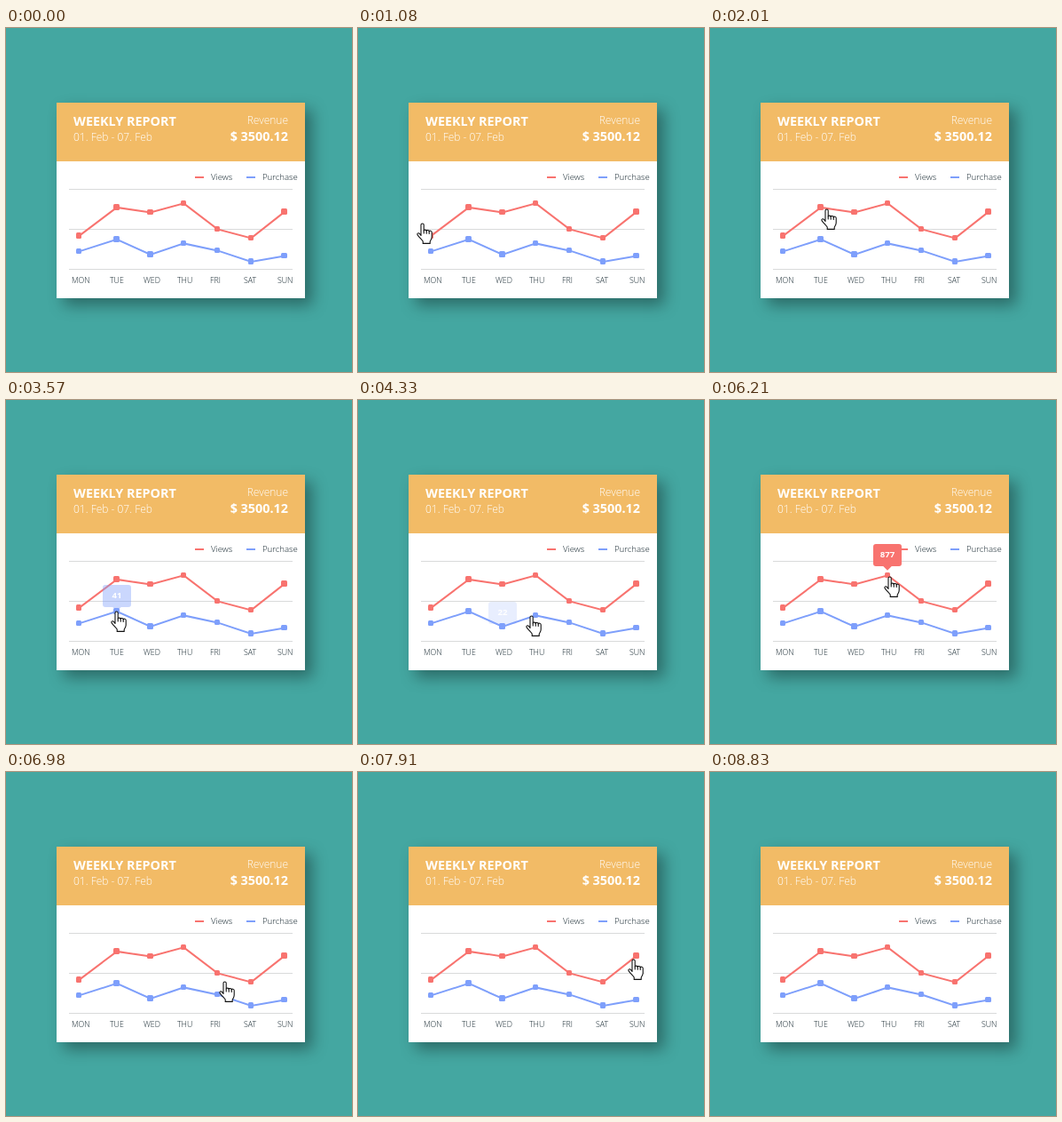
An HTML page that plays this animation: 390 px wide and 387 px high, repeating every 9540 ms.

```html
<!DOCTYPE html>
<html lang="en">
<head>
<meta charset="utf-8">
<title>Weekly report</title>
<style>
  html, body { margin: 0; width: 100%; height: 100%; overflow: hidden; background: #44a7a1; }
  .card {
    position: absolute; left: 57px; top: 84px; width: 280px; height: 220px;
    background: linear-gradient(#f2bb66 66px, #fff 66px);
    box-shadow: 8px 8px 16px rgba(0, 0, 0, .36);
  }
  svg { position: absolute; left: 0; top: 0; display: block; }
  text { font-family: "Open Sans", sans-serif; font-weight: 300; fill: #10222b; }
  .head text { font-size: 12px; fill: #fff; }
  .head .bold { font-size: 14.4px; font-weight: 700; }
  .end { text-anchor: end; }
  .legend text { font-size: 9.6px; }
  .days text { font-size: 8.8px; }
  .tip text { font-size: 9.6px; font-weight: 700; fill: #fff; text-anchor: middle; }
</style>
</head>
<body>
<div class="card"></div>
<svg width="390" height="387" viewBox="0 0 390 387">
  <g class="head">
    <text class="bold" x="76" y="110">WEEKLY REPORT</text>
    <text x="76" y="127">01. Feb - 07. Feb</text>
    <text class="end" x="318" y="108">Revenue</text>
    <text class="bold end" x="318" y="127">$ 3500.12</text>
  </g>
  <g class="legend">
    <path d="M213 168h10" stroke="#f8736f" stroke-width="2"/>
    <text x="231" y="171">Views</text>
    <path d="M271 168h10" stroke="#7e9ffb" stroke-width="2"/>
    <text x="289" y="171">Purchase</text>
  </g>
  <path d="M71 181.5h252M71 226.5h252M71 271.5h252" stroke="#d9dadb"/>
  <g class="days" id="days"></g>
  <g id="chart"></g>
  <g id="tips"></g>
  <g id="hand" stroke="#111" stroke-width="1.1" stroke-linejoin="round" stroke-linecap="round">
    <path fill="#fff" d="M5 14.5V2.6a1.6 1.6 0 0 1 3.2 0V9c0-1.3 3-1.2 3 .3c0-1.3 3-1.1 3 .6c0-1.2 3-1 3 .9V16c0 2.8-1.6 3.8-2 5.4v2H7.2V21C6 19 3.2 16.8 1 13.6C.3 12 2.2 11 3.4 12.4Z"/>
    <path fill="none" d="M8.2 9v3M11.2 9.3v2.9M14.2 9.9v2.6"/>
  </g>
</svg>
<script>
const LOOP = 9540, TICK = 155;
const FADE_IN = 380, FADE_OUT = 150, RISE = 10;

const $ = id => document.getElementById(id);
const clamp = v => Math.max(0, Math.min(1, v));
const ease = k => k * k * (3 - 2 * k);

function add(parent, name, attrs, label) {
  const el = document.createElementNS('http://www.w3.org/2000/svg', name);
  for (const key in attrs) el.setAttribute(key, attrs[key]);
  if (label) el.textContent = label;
  parent.appendChild(el);
  return el;
}

const xs = [82, 124.5, 162.5, 200, 238, 276, 313.5];
const lines = [
  { color: '#f8736f', ys: [233.5, 201.5, 207, 197, 226, 236, 206.5] },
  { color: '#7e9ffb', ys: [251, 237.5, 254.5, 242, 250, 262.5, 256] }
];
const dots = lines.flatMap(({ color, ys }) => ys.map((y, i) => ({ x: xs[i], y, color })));

const labelX = [74, 117, 155, 193, 230, 268, 306];
['MON', 'TUE', 'WED', 'THU', 'FRI', 'SAT', 'SUN'].forEach((day, i) =>
  add($('days'), 'text', { x: labelX[i], y: 287 }, day));

for (const { color, ys } of lines) {
  const points = xs.map((x, i) => `${x + .4},${ys[i] + .4}`).join(' ');
  add($('chart'), 'polyline', { points, fill: 'none', stroke: color, 'stroke-width': 2 });
}

// markers cover whole pixels
const span = v => [Math.floor(v - 3), Math.ceil(v + 3) - Math.floor(v - 3)];
for (const { x, y, color } of dots) {
  const [left, width] = span(x), [top, height] = span(y);
  add($('chart'), 'rect', { x: left, y: top, width, height, rx: 1.5, fill: color });
}

// where the pointer rests: arrival, departure, left, top, tooltip
const stops = [
  [155, 155, 293, 280],
  [1085, 1085, 66, 219],
  [1170, 1860, 76, 234, '431'],
  [2015, 2790, 125, 203, '824'],
  [3410, 3875, 118, 237, '41'],
  [4100, 4290, 157, 252, '22'],
  [4340, 4340, 189, 242],
  [5735, 6360, 196, 198, '877'],
  [6750, 6900, 232, 227, '512'],
  [7130, 7440, 264, 260],
  [7905, 8370, 304, 210, '756'],
  [8835, 8835, 384, 322]
];

function nearest(x, y) {
  const far = d => Math.hypot(d.x - x, d.y - y);
  return dots.reduce((a, b) => far(b) < far(a) ? b : a);
}

const tips = stops.filter(s => s[4]).map(([start, end, left, top, label]) => {
  const { x, y, color } = nearest(left + 6, top);
  const el = add($('tips'), 'g', { class: 'tip' });
  add(el, 'rect', { x: -16, y: -35, width: 32, height: 25, rx: 3, fill: color });
  add(el, 'path', { d: 'M-5-10.2h10l-5 5z', fill: color });
  add(el, 'text', { x: 0, y: -20 }, label);
  return { el, start, end, x: Math.round(x), y: Math.floor(y) };
});

function pointerAt(t) {
  const i = stops.findIndex(s => s[0] > t);
  const [, leave, x0, y0] = stops[i - 1], [arrive, , x1, y1] = stops[i];
  const k = ease(clamp((t - leave) / (arrive - leave)));
  return [x0 + (x1 - x0) * k, y0 + (y1 - y0) * k].map(Math.round);
}

const move = (el, x, y) => el.setAttribute('transform', `translate(${x} ${y})`);

function draw(time) {
  // the picture advances in even ticks
  const t = Math.floor((time % LOOP + 30) / TICK) * TICK;
  for (const { el, start, end, x, y } of tips) {
    const shown = clamp((Math.min(t, end) - start) / FADE_IN);
    const alpha = clamp(shown - Math.max(0, t - end) / FADE_OUT);
    el.setAttribute('opacity', alpha);
    move(el, x, y + Math.round(RISE * (1 - alpha)));
  }
  const visible = t >= stops[0][0] && t < stops[stops.length - 1][0];
  $('hand').setAttribute('visibility', visible ? 'visible' : 'hidden');
  if (visible) move($('hand'), ...pointerAt(t));
}

const begin = performance.now();
function tick() {
  draw(performance.now() - begin);
  requestAnimationFrame(tick);
}
draw(0);
requestAnimationFrame(tick);
</script>
</body>
</html>
```
